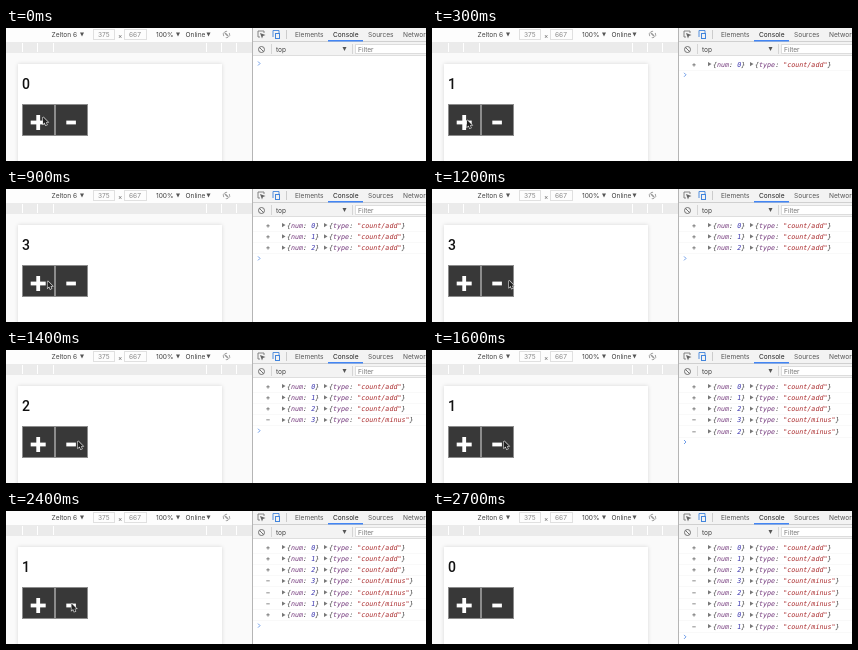
An HTML page with a canvas that plays this animation: 420x133 px, repeating every 2800 ms.

```html
<!DOCTYPE html>
<html lang="en">
<head>
<meta charset="utf-8">
<title>Counter with console log</title>
<style>
html, body { margin: 0; width: 100%; height: 100%; overflow: hidden; background: #fff; }
canvas { display: block; width: 420px; height: 133px; }
</style>
</head>
<body>
<canvas id="stage" width="420" height="133"></canvas>
<script>
const ctx = document.getElementById('stage').getContext('2d');
const LOOP = 2800, STEP = 100, ROW = 11.3;
const UI = 'Inter, "Liberation Sans", sans-serif';
const MONO = '"DejaVu Sans Mono", monospace';
const LOG_SIZE = '6.7px';

// Times of the clicks and their effect on the counter.
const clicks = [
  [300, 1], [500, 1], [800, 1], [1400, -1],
  [1600, -1], [1900, -1], [2300, 1], [2600, -1]
];
// Pointer tip: time, x, y.
const pointerPath = [
  [0, 37, 89], [300, 35, 92], [800, 35, 92], [1200, 77, 91.5],
  [1400, 72, 91], [1800, 72, 91], [2100, 33, 93],
  [2300, 34, 93], [2400, 65.5, 92.5], [2600, 65.5, 93]
];

function rect(x, y, w, h, color) {
  ctx.fillStyle = color;
  ctx.fillRect(x, y, w, h);
}

function text(str, x, y, color = '#444', font = `6.6px ${UI}`) {
  ctx.font = font;
  ctx.fillStyle = color;
  ctx.fillText(str, x, y);
  return x + ctx.measureText(str).width;
}

function polygon(points, color) {
  ctx.beginPath();
  points.forEach(([x, y]) => ctx.lineTo(x, y));
  ctx.closePath();
  ctx.fillStyle = color;
  ctx.fill();
}

function stroke(points, color, width = 1) {
  ctx.beginPath();
  points.forEach(([x, y]) => ctx.lineTo(x, y));
  ctx.strokeStyle = color;
  ctx.lineWidth = width;
  ctx.stroke();
}

function frame(x, y, w, h, color) {
  ctx.strokeStyle = color;
  ctx.lineWidth = 1;
  ctx.strokeRect(x + .5, y + .5, w - 1, h - 1);
}

function arc(x, y, r, color, from = 0, to = Math.PI * 2) {
  ctx.beginPath();
  ctx.arc(x, y, r, from, to);
  ctx.strokeStyle = color;
  ctx.lineWidth = .9;
  ctx.stroke();
}

const downArrow = (x, y) => polygon([[x, y], [x + 4, y], [x + 2, y + 4]], '#555');

function drawDeviceBar() {
  rect(0, 0, 246, 133, '#fafafa');
  rect(0, 0, 246, 14, '#fdfdfd');
  text('Zelton 6', 45.5, 9);
  downArrow(74, 4.5);
  frame(87, 1, 22, 11, '#e0e0e0');
  text('375', 92, 9, '#888');
  text('×', 112, 9.5, '#666');
  frame(118, 1, 23, 11, '#e0e0e0');
  text('667', 123, 9, '#888');
  text('100%', 150, 9);
  downArrow(170, 4.5);
  text('Online', 179.5, 9);
  downArrow(200.5, 4.5);
  arc(220.5, 6.5, 3.2, '#999', -.5, 1.8);
  arc(220.5, 6.5, 3.2, '#999', 2.6, 4.9);
  stroke([[219, 5], [222, 8]], '#999', 1.6);

  rect(0, 14, 246, 11, '#ebebeb');
  for (const x of [16, 31, 47, 200, 215, 230]) rect(x, 15, 1, 9, '#fff');
}

function drawButton(x) {
  rect(x, 76, 33, 32, '#8c8c8c');
  rect(x + 1, 77, 31, 30, '#383838');
}

function drawPage(count) {
  ctx.save();
  ctx.shadowColor = 'rgba(0,0,0,.14)';
  ctx.shadowBlur = 4;
  rect(12, 36, 204, 110, '#fff');
  ctx.restore();

  text(count, 16, 61, '#111', '500 14px Roboto, "Liberation Sans", sans-serif');
  drawButton(16);
  drawButton(49);
  rect(24.7, 92.6, 15, 3.8, '#fff');
  rect(30.3, 87, 3.8, 15, '#fff');
  rect(60.3, 92.6, 9.6, 3.8, '#fff');
}

function drawDevtools() {
  rect(246, 0, 174, 133, '#fff');
  rect(246, 0, 174, 27, '#f3f3f3');
  rect(246, 0, 1, 133, '#b5b5b5');
  rect(247, 13, 173, 1, '#d0d0d0');
  rect(247, 27, 173, 1, '#dedede');

  stroke([[258, 5], [258, 3], [252, 3], [252, 9], [254, 9]], '#777', .9);
  polygon([[254, 5], [259.5, 7], [257, 8], [256, 10.5]], '#666');
  stroke([[267, 9], [267, 2.5], [273, 2.5], [273, 5]], '#4285dc', .9);
  frame(269, 5, 5, 6, '#4285dc');
  rect(280, 2, 1, 9, '#ccc');

  text('Elements', 289, 9, '#555');
  text('Console', 327, 9, '#222');
  text('Sources', 362, 9, '#555');
  text('Network', 397, 9, '#555');
  rect(322, 12, 35, 1.5, '#4285f4');

  arc(255.5, 21.5, 3, '#666');
  stroke([[253.4, 19.4], [257.6, 23.6]], '#666', .9);
  rect(265, 16, 1, 10, '#d5d5d5');
  text('top', 270, 23.5);
  downArrow(336.5, 19);
  rect(346, 16, 1, 10, '#d5d5d5');
  rect(349, 16, 71, 10, '#fff');
  frame(349, 16, 80, 10, '#ddd');
  text('Filter', 352, 23.5, '#777');
}

function drawObject(x, y, key, value, valueColor) {
  const font = `italic ${LOG_SIZE} ${MONO}`;
  polygon([[x, y - 4.5], [x + 3.5, y - 2.4], [x, y - .3]], '#777');
  let end = text('{', x + 5, y, '#444', font);
  end = text(key, end, y, '#74397c', font);
  end = text(': ', end, y, '#444', font);
  end = text(value, end, y, valueColor, font);
  text('}', end, y, '#444', font);
}

function drawLog(done) {
  let before = 0;
  done.forEach(([, delta], i) => {
    const y = 38.5 + i * ROW;
    const action = delta > 0 ? 'add' : 'minus';
    text(delta > 0 ? '+' : '−', 260, y, '#333', `${LOG_SIZE} ${MONO}`);
    drawObject(276, y, 'num', String(before), '#3a34ae');
    drawObject(318, y, 'type', `"count/${action}"`, '#aa2a2c');
    rect(247, Math.round(y + 3), 173, 1, '#f9f9f9');
    before += delta;
  });
  const y = 35.5 + done.length * ROW;
  stroke([[252, y - 2], [254, y], [252, y + 2]], '#5f92e6', .9);
}

function drawPointer(time) {
  const next = pointerPath.findIndex(p => p[0] > time);
  if (next < 0 && time > 2600) return;
  const to = pointerPath[next < 0 ? pointerPath.length - 1 : next];
  const from = next < 0 ? to : pointerPath[next - 1];
  const p = to === from ? 0 : (time - from[0]) / (to[0] - from[0]);
  const ease = p * p * (3 - 2 * p);
  const x = from[1] + (to[1] - from[1]) * ease;
  const y = from[2] + (to[2] - from[2]) * ease;
  const arrow = [[0, 0], [0, 7], [1.6, 5.6], [2.7, 8.2], [4, 7.6], [2.9, 5.2], [5, 5], [0, 0]]
    .map(([dx, dy]) => [x + dx, y + dy]);
  stroke(arrow, '#ddd', 1.2);
  polygon(arrow, '#222');
}

function draw(now) {
  const time = Math.floor(now % LOOP / STEP) * STEP;
  const done = clicks.filter(([at]) => at <= time);
  drawDeviceBar();
  drawPage(done.reduce((sum, [, delta]) => sum + delta, 0));
  drawDevtools();
  drawLog(done);
  drawPointer(time);
}

const start = performance.now();
function tick() {
  draw(performance.now() - start);
  requestAnimationFrame(tick);
}
tick();
</script>
</body>
</html>
```
